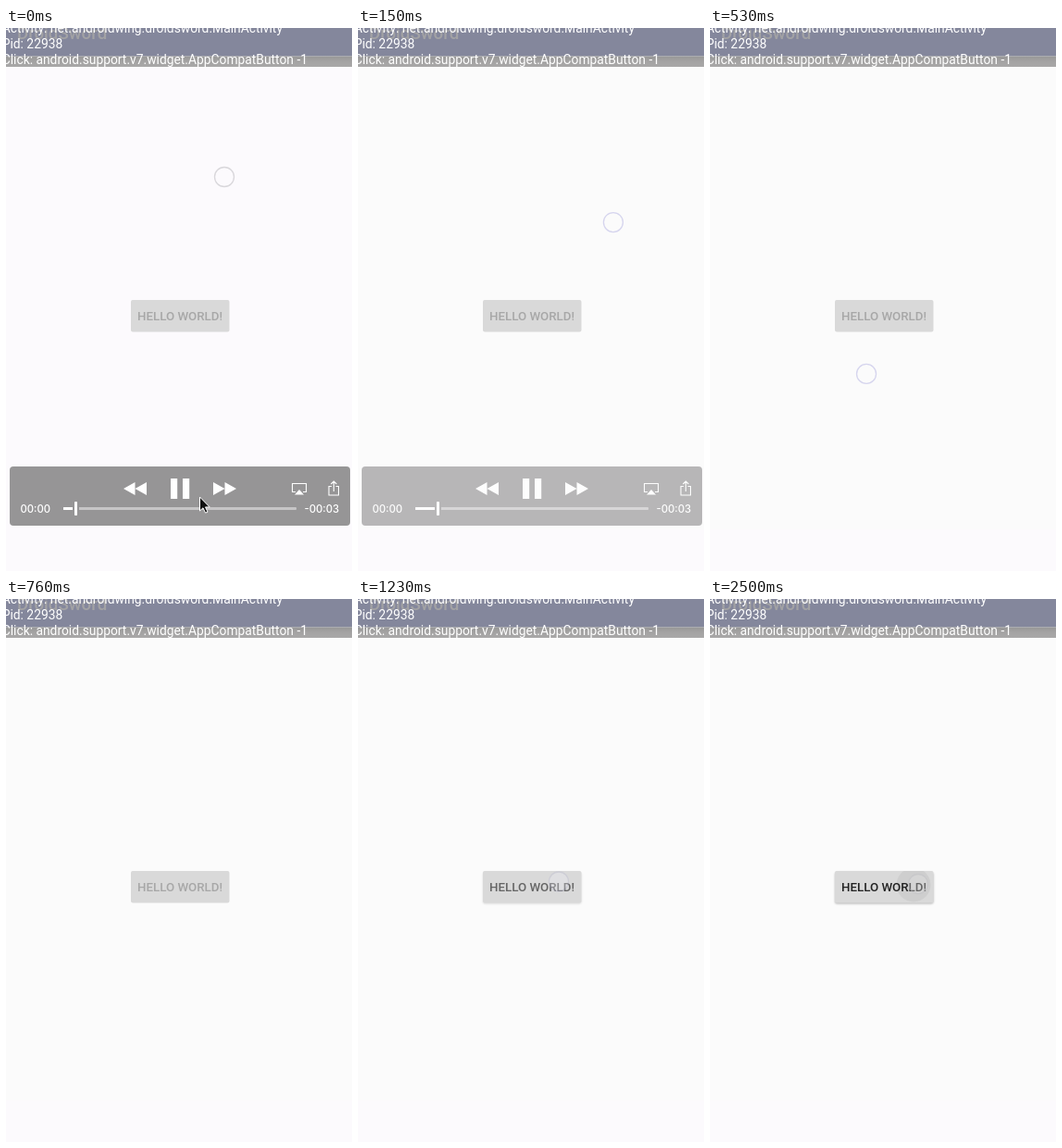
Animation, 374 px wide and 587 px high, one loop 2.6 s. Source, as an HTML page:

```html
<!DOCTYPE html>
<html lang="en">
<head>
<meta charset="utf-8">
<title>Button click</title>
<style>
  html, body { margin: 0; width: 100%; height: 100%; overflow: hidden; background: #fcfafd; }
  svg { display: block; width: 374px; height: 587px; }
  text { font-family: Roboto, sans-serif; white-space: pre; }
  .log { font-size: 13.84px; fill: #fff; }
  .title { font-size: 18.7px; font-weight: 500; fill: #a2a2a4; }
  .label { font-size: 13.3px; font-weight: 500; text-anchor: middle; }
  .time { font-family: Inter, sans-serif; font-size: 11.3px; font-weight: 500; fill: #fff; }
  .line { fill: none; stroke: #fff; stroke-width: 1.1; }
</style>
</head>
<body>
<svg viewBox="0 0 374 587">
  <defs>
    <linearGradient id="strip" x2="0" y2="1">
      <stop offset="0" stop-color="#989897"/>
      <stop offset=".5" stop-color="#a4a3a3"/>
      <stop offset="1" stop-color="#a9a8a8"/>
    </linearGradient>
    <filter id="soft" x="-10%" y="-30%" width="120%" height="160%"><feGaussianBlur stdDeviation=".9"/></filter>
    <clipPath id="face"><rect x="135" y="294" width="106.5" height="34.5" rx="2"/></clipPath>
  </defs>

  <rect width="374" height="587" fill="#fcfafd"/>
  <rect id="page" width="374" height="542" fill="#fbfbfb"/>

  <rect width="374" height="30.5" fill="#84879c"/>
  <rect y="30.5" width="374" height="11.5" fill="url(#strip)"/>
  <text class="title" x="12" y="12">DroidSword</text>
  <g class="log">
    <text x="-4.300" y="5">Activity: net.androidwing.droidsword.MainActivity</text>
    <text x="-4.300" y="22">Pid: 22938</text>
    <text x="-4.300" y="39">Click: android.support.v7.widget.AppCompatButton -1</text>
  </g>

  <rect id="shadow" x="135" y="295.500" width="106.500" height="34" rx="2" filter="url(#soft)"/>
  <rect x="135" y="294" width="106.5" height="34.5" rx="2" fill="#d9d9d9"/>
  <g clip-path="url(#face)"><circle id="ripple" cx="220" cy="309" r="18.5" fill-opacity=".05"/></g>
  <text id="label" class="label" x="188" y="316">HELLO WORLD!</text>

  <g id="player">
    <rect x="4" y="474" width="368" height="64" rx="4" fill="#969596"/>
    <g fill="#fff">
      <path d="M139.500 491v14l-12.500-7zM152 491v14l-12.500-7z"/>
      <path d="M178 487h7.200v22h-7.200zM191 487h7.200v22h-7.200z"/>
      <path d="M224 491v14l12.500-7zM236.500 491v14l12.500-7z"/>
      <path d="M312 504.500l5-5.500 5 5.500z"/>
    </g>
    <path class="line" d="M313 501.500h-3.500v-9h15v9h-3.500"/>
    <path class="line" d="M352 495.500h-3v9.500h10.500v-9.500h-3M354.300 501v-10.500M351.300 493l3-3 3 3"/>
    <text class="time" x="15.500" y="523.500">00:00</text>
    <text class="time" x="322.500" y="523.500">-00:03</text>
    <rect x="62" y="518" width="252" height="3" rx="1" fill="#c6c5c6"/>
    <rect id="played" x="62" y="518" height="3" fill="#fff"/>
    <g id="knob">
      <rect x="-3.500" y="517" width="7" height="5" fill="#969596"/>
      <rect x="-1.500" y="512" width="3" height="15" rx=".8" fill="#fff"/>
    </g>
  </g>
  <path id="pointer" d="M209.500 507v15l3.500-3.200 2.600 5.400 2.400-1.100-2.500-5.200h4.700z"
        fill="#111" stroke="#fff" stroke-width="1"/>
  <circle id="touch" r="10.500" stroke-width="1.300"/>
</svg>
<script>
const LOOP = 2600, SWING = 240, REST = 580, TAP = 1110, PRESS = 2500;
const REFRESH = [0, 60, 150, 240, 320, 390, 460, 530, REST, 640, 760,
                 TAP, 1170, 1230, 1290, 1350, PRESS];

const progress = (t, from, to) => Math.min(1, Math.max(0, (t - from) / (to - from)));

function set(id, attributes) {
  const element = document.getElementById(id);
  for (const name in attributes) element.setAttribute(name, attributes[name]);
}

// The finger moves out to the right, then sweeps round a quarter ellipse.
function dragPoint(t) {
  if (t < SWING) {
    const u = t / SWING;
    return [236 + 76 * u ** 1.37, 161 + 83 * u ** 1.12];
  }
  const angle = 1.65 * (1 - (1 - progress(t, SWING, REST)) ** 2);
  return [175 + 137 * Math.cos(angle), 244 + 130 * Math.sin(angle)];
}

function touchLook(t) {
  if (t >= PRESS) return { point: [225, 308], opacity: .55, stroke: "#c4c4c8", fill: "#e4e4e4a0" };
  if (t >= TAP) return {
    point: [217, 305.5], opacity: 1 - progress(t, TAP, 1290), stroke: "#b6b6d0", fill: "#f2f2fbd0"
  };
  return {
    point: dragPoint(t), opacity: 1 - progress(t, REST, 760),
    stroke: t ? "#d6d5ee" : "#d9d7db", fill: "none"
  };
}

function draw(t) {
  const seek = 75.5 + .073 * t;
  const enabled = progress(t, TAP, 1350);
  const grey = 167 - 133 * enabled;
  const { point, ...look } = touchLook(t);

  set("page", { opacity: progress(t, 0, 150) });
  set("player", { opacity: 1 - progress(t, 0, 262) ** 2 });
  set("pointer", { opacity: t ? 0 : 1 });
  set("knob", { transform: `translate(${seek})` });
  set("played", { width: Math.min(252, seek - 65.5) });
  set("label", { fill: `rgb(${grey}, ${grey}, ${grey})` });
  set("shadow", { opacity: .27 * enabled });
  set("ripple", { opacity: t >= PRESS ? 1 : 0 });
  set("touch", { transform: `translate(${point})`, ...look });
}

function tick() {
  const now = performance.now() - start;
  const t = Math.max(0, now) % LOOP;
  draw(REFRESH.findLast(moment => moment <= t));
  requestAnimationFrame(tick);
}

const start = performance.now();
tick();
</script>
</body>
</html>
```
